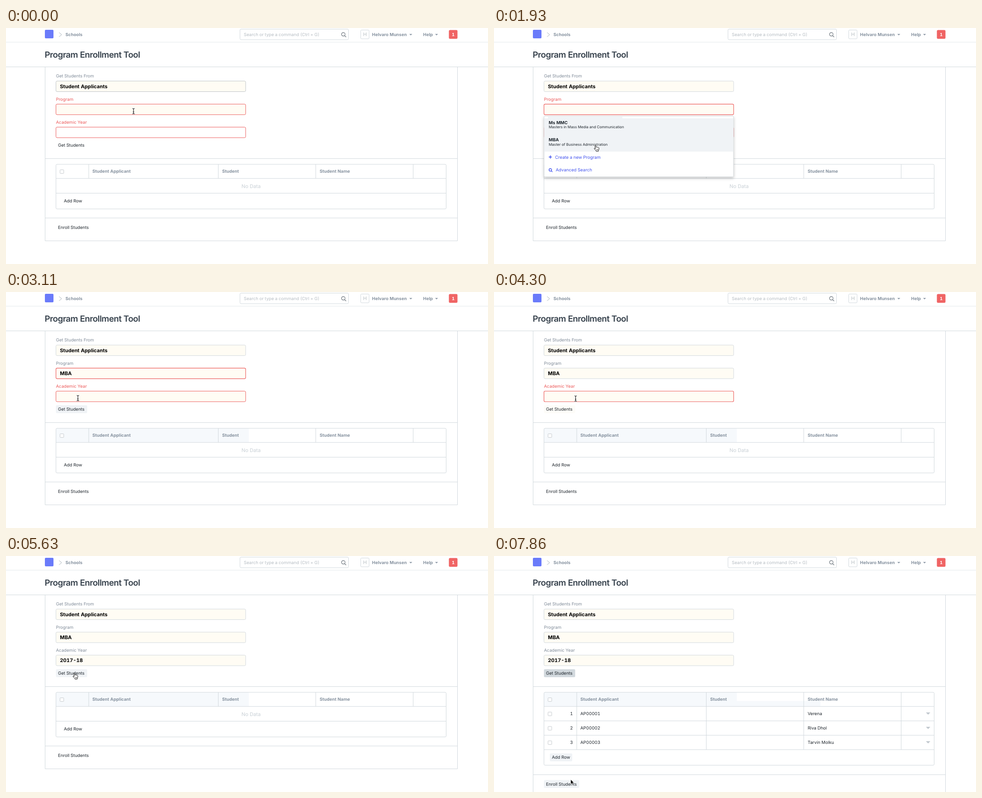
An HTML page that plays this animation: 1066 by 525 pixels, repeating every 8 s.

```html
<!DOCTYPE html>
<html lang="en">
<head>
<meta charset="utf-8">
<title>Program Enrollment Tool</title>
<style>
  html, body { margin: 0; width: 100%; height: 100%; overflow: hidden; background: #fff; }
  svg { display: block; width: 1066px; height: 525px; }
  text { font: 9.6px Inter, sans-serif; font-variant-numeric: tabular-nums; fill: #1f262d; text-rendering: geometricPrecision; white-space: pre; }
  .title { font-size: 18.8px; font-weight: 600; letter-spacing: -.55px; fill: #36414c; }
  .gray { fill: #808c99; }
  .head { fill: #8793a0; font-weight: 700; }
  .bold { font-weight: 700; }
  .value { font-size: 11.2px; font-weight: 700; fill: #000; }
  .pale { fill: #b6bdc3; }
  .none { font-size: 11.2px; fill: #c9d0d6; }
  .small { font-size: 8.1px; }
  .link { fill: #4455ee; }
  .count { fill: #fff; font-weight: 700; }
  .popup { filter: drop-shadow(0 3px 3px rgba(0, 0, 0, .22)); }
</style>
</head>
<body>
<svg id="stage" viewBox="0 0 1066 525"></svg>
<script>
const LOOP = 8000, STEP = LOOP / 54;
const LINE = '#d1d8dd', RED = '#ec5a5a', CREAM = '#fffcf4', HOVER = '#f0f3f6';
const stage = document.getElementById('stage');

function add(parent, tag, attrs, str) {
  const node = document.createElementNS('http://www.w3.org/2000/svg', tag);
  for (const key in attrs) node.setAttribute(key, attrs[key]);
  if (str) node.textContent = str;
  return parent.appendChild(node);
}
const group = (parent = stage, attrs = {}) => add(parent, 'g', attrs);
const text = (p, x, y, str, cls = '', anchor = 'start') =>
  add(p, 'text', { x, y, class: cls, 'text-anchor': anchor }, str);
const rect = (p, x, y, width, height, fill = 'none', stroke = 'none', rx = 0) =>
  add(p, 'rect', { x, y, width, height, fill, stroke, rx });
const path = (p, d, stroke = LINE, fill = 'none', width = 1) =>
  add(p, 'path', { d, stroke, fill, 'stroke-width': width });
const caret = (p, x, y, w, h, fill) => path(p, `M${x} ${y}h${w}l${-w / 2} ${h}z`, 'none', fill);
const lens = (p, x, y, r, color, w) =>
  path(p, `M${x - r} ${y}a${r} ${r} 0 1 1 ${2 * r} 0a${r} ${r} 0 1 1 ${-2 * r} 0M${x + r * .7} ${y + r * .7}l${r * .9} ${r * .9}`, color, 'none', w);
const check = (p, y) => rect(p, 119.5, y, 8.2, 8.2, '#fff', '#c4c9cd', 1);

// Header
path(stage, 'M0 31.5H1066', '#e4e8eb');
path(stage, 'M0 86.5H1066');
rect(stage, 86, 4, 19, 19, '#6a7bfa', 'none', 2);
path(stage, 'M117.5 10l5.5 4.8l-5.5 4.8', '#a5afb8');
text(stage, 131.5, 18.4, 'Schools', 'head');
rect(stage, 517.5, 2.5, 240, 23.5, '#fff', LINE, 2.5);
text(stage, 526, 18.4, 'Search or type a command (Ctrl + G)', 'pale');
lens(stage, 746, 14, 3.9, '#6c757d', 1.2);
rect(stage, 784.5, 4.5, 18.5, 19.5, '#fff', LINE, 2);
text(stage, 793.8, 18.4, 'H', 'pale', 'middle').style.fontSize = '11px';
text(stage, 809.5, 18, 'Helvaro Munsen', 'head');
caret(stage, 892, 13.3, 6.4, 3.3, '#8d99a6');
text(stage, 922.5, 18, 'Help', 'head');
caret(stage, 949, 13.3, 6.4, 3.3, '#8d99a6');
rect(stage, 979.5, 4.5, 19, 19.5, '#f06464', 'none', 2.5);
text(stage, 989, 18, '1', 'count', 'middle');
text(stage, 85.5, 65.5, 'Program Enrollment Tool', 'title');

// Form
function field(y, label, value) {
  return {
    label: text(stage, 110.5, y - 7.6, label, 'gray'),
    box: rect(stage, 110.5, y, 419.5, 23.5, CREAM, LINE, 2.5),
    value: text(stage, 119.3, y + 15.9, value, 'value')
  };
}
const from = field(118, 'Get Students From', 'Student Applicants');
const program = field(169.3, 'Program', 'MBA');
const year = field(220.5, 'Academic Year', '2017-18');
const getButton = rect(stage, 110.5, 252, 69, 17.5, '#fff', 'none', 2);
text(stage, 115, 264.3, 'Get Students');
path(stage, 'M86.5 87V290.5H998.5V87');

// Table header
const tint = rect(stage, 111, 303.5, 426, 31, '#f6f9fc');
const lateTint = rect(stage, 537, 322.5, 185, 12, '#f6f9fc');
check(stage, 315.4);
[[191, 'Student Applicant'], [478, 'Student'], [693.7, 'Student Name']]
  .forEach(([x, s]) => text(stage, x, 321.8, s, 'head'));
const columns = y => [183, 469.5, 685, 900.5].map(x => `M${x} 303V${y}`).join('');

const empty = group();
rect(empty, 110.5, 303.2, 863, 99.3, 'none', LINE, 2.5);
path(empty, 'M111 334.7H973.5M111 367.5H973.5' + columns(334.7));
text(empty, 542, 355.6, 'No Data', 'none', 'middle');
text(empty, 128, 388.3, 'Add Row');
path(empty, 'M86.5 290V473.5H998.5V290M86.5 422.7H998.5');
text(empty, 115, 447.4, 'Enroll Students');

const filled = group();
rect(filled, 110.5, 303.2, 863, 162.2, 'none', LINE, 2.5);
path(filled, 'M111 334.7H973.5' + columns(430.8));
['Verena', 'Riva Dhol', 'Tarvin Molku'].forEach((name, i) => {
  const y = 334.7 + 32 * i;
  path(filled, `M111 ${y + 32.1}H973.5`);
  check(filled, y + 12.5);
  text(filled, 174.6, y + 19.3, String(i + 1), '', 'end');
  text(filled, 191, y + 19.3, 'AP0000' + (i + 1));
  text(filled, 693.7, y + 19.3, name);
  caret(filled, 955.3, y + 13.4, 9.6, 5, '#c1c8ce');
});
rect(filled, 123.5, 439.3, 49.5, 17.5, HOVER, 'none', 2);
text(filled, 128, 451.4, 'Add Row');
path(filled, 'M86.5 290V526M998.5 290V526M86.5 486.5H998.5');
rect(filled, 110.5, 498.5, 78, 17.5, HOVER, 'none', 2);
text(filled, 115, 510.8, 'Enroll Students');

// Suggestion lists
const plus = (p, x, y) => path(p, `M${x - 3.5} ${y}h7M${x} ${y - 3.5}v7`, '#4455ee', 'none', 1.7);
const programs = group();
rect(programs, 110.8, 196, 419, 135, '#fff', '#d5dadd', 1.5).classList.add('popup');
rect(programs, 119, 196.5, 165, 5, HOVER);
const programHover = rect(programs, 111.3, 201, 418, 74, HOVER);
text(programs, 121, 213.7, 'Ms MMC', 'bold');
text(programs, 121, 223.2, 'Masters in Mass Media and Communication', 'small');
text(programs, 121, 252, 'MBA', 'bold');
text(programs, 121, 261.6, 'Master of Business Administration', 'small');
plus(programs, 124.6, 287);
text(programs, 135, 290.5, 'Create a new Program', 'link');
lens(programs, 124.6, 315.6, 2.9, '#4455ee', 1.4);
text(programs, 136.5, 319.4, 'Advanced Search', 'link');

const years = group();
rect(years, 110.8, 247, 419, 159, '#fff', '#d5dadd', 1.5).classList.add('popup');
rect(years, 111.3, 247.5, 418, 28.5, HOVER);
for (let i = 0; i < 5; i++)
  text(years, 121, 265 + 28.8 * i, `${2017 - i}-${18 - i}`, 'bold');
add(add(years, 'clipPath', { id: 'cut' }), 'rect', { x: 111, y: 390, width: 418, height: 15.7 });
const more = group(years, { 'clip-path': 'url(#cut)' });
plus(more, 124.6, 405.5);
text(more, 135, 409, 'Create a new Academic Year', 'link');

const programCaret = path(stage, 'M119.8 174.5v13', '#000');
const yearCaret = path(stage, 'M119.8 225.8v13', '#000');

// Pointers
const pointers = { beam: group(), hand: group(), arrow: group() };
const beam = 'M-2.6 -6Q0 -6 0 -4.5Q0 -6 2.6 -6M0 -4.5V4.5M-2.6 6Q0 6 0 4.5Q0 6 2.6 6M-1.5 1.8h3';
path(pointers.beam, beam, '#fff', 'none', 2.4);
path(pointers.beam, beam, '#111', 'none', 1.1);
path(pointers.hand, 'M2.2 1.3C1.9 0 3.9 -.3 4.3 1L5.2 4.3C5.8 3.5 7 3.6 7.3 4.5C8 3.9 9 4.1 9.3 5C10.2 4.6 11 5.1 11.1 6.1C11.4 8.5 10.9 10 9.9 11.3V13.2H4.9L4.6 11.8C3.4 10.7 2.2 9.3 .7 7.7C0 6.8 1.2 5.9 2.1 6.6L3.4 7.5Z', '#111', '#fff');
path(pointers.hand, 'M5.9 8.4v2.8M7.4 8.4v2.8M8.9 8.4v2.8', '#111', 'none', .6);
path(pointers.arrow, 'M0 0V10.6L2.4 8.4L4.1 12.2L6 11.4L4.4 7.7H7.6Z', '#fff', '#000', .8);

// step, x, y, pointer
const track = [
  [0, 282, 185, 'beam'], [8, 282, 185, 'beam'], [9, 266, 206, 'hand'], [13, 221, 261, 'hand'],
  [17, 221, 261, 'arrow'], [18, 204, 260, 'arrow'], [20, 163, 255, 'hand'], [21, 159, 236, 'beam'],
  [24, 159, 236, 'beam'], [28, 180.5, 237, 'beam'], [31, 180.5, 237, 'beam'], [32, 174, 249, 'hand'],
  [34, 158, 258.5, 'hand'], [36, 158, 258.5, 'hand'], [39, 144, 261.5, 'hand'], [44, 144, 261.5, 'hand'],
  [46, 147, 265, 'arrow'], [48, 147, 265, 'arrow'], [53, 169.5, 497, 'arrow'], [54, 169.5, 497, 'arrow']
];

const show = (node, on) => node.setAttribute('visibility', on ? 'visible' : 'hidden');
function style(f, { error, focus, filled, fill = CREAM, stroke = LINE }) {
  f.label.style.fill = error ? RED : '';
  f.box.setAttribute('stroke', error || focus ? RED : stroke);
  f.box.setAttribute('stroke-width', focus ? 1.15 : 1);
  f.box.setAttribute('fill', fill);
  show(f.value, filled);
}

function draw(n) {
  const within = (a, b) => n >= a && n < b;
  style(from, { filled: true, stroke: n < 1 ? '#bdc3c7' : LINE });
  style(program, { error: n < 17, focus: within(1, 25), filled: n >= 17 });
  style(year, { error: n < 36, focus: within(25, 36), filled: n >= 36, fill: n < 17 ? '#fff' : CREAM });
  getButton.setAttribute('fill', n >= 41 ? LINE : within(20, 24) || n >= 38 ? HOVER : n >= 24 ? '#fdfcf8' : '#fff');
  show(programs, within(6, 17));
  programHover.setAttribute('height', n < 12 ? 37 : 74);
  show(years, within(30, 36));
  show(tint, n >= 17);
  show(lateTint, n >= 51);
  show(empty, n < 41);
  show(filled, n >= 41);
  show(programCaret, within(3, 6));
  show(yearCaret, within(32, 36));

  const i = track.findLastIndex(k => k[0] <= n);
  const a = track[i], b = track[i + 1];
  const p = (n - a[0]) / (b[0] - a[0]), e = p * p * (3 - 2 * p);
  for (const kind in pointers) show(pointers[kind], kind === a[3]);
  pointers[a[3]].setAttribute('transform', `translate(${a[1] + (b[1] - a[1]) * e} ${a[2] + (b[2] - a[2]) * e})`);
}

const start = performance.now();
function tick() {
  const t = (performance.now() - start) % LOOP;
  draw(Math.min(53, Math.floor((t + 8) / STEP)));
  requestAnimationFrame(tick);
}
tick();
</script>
</body>
</html>
```
